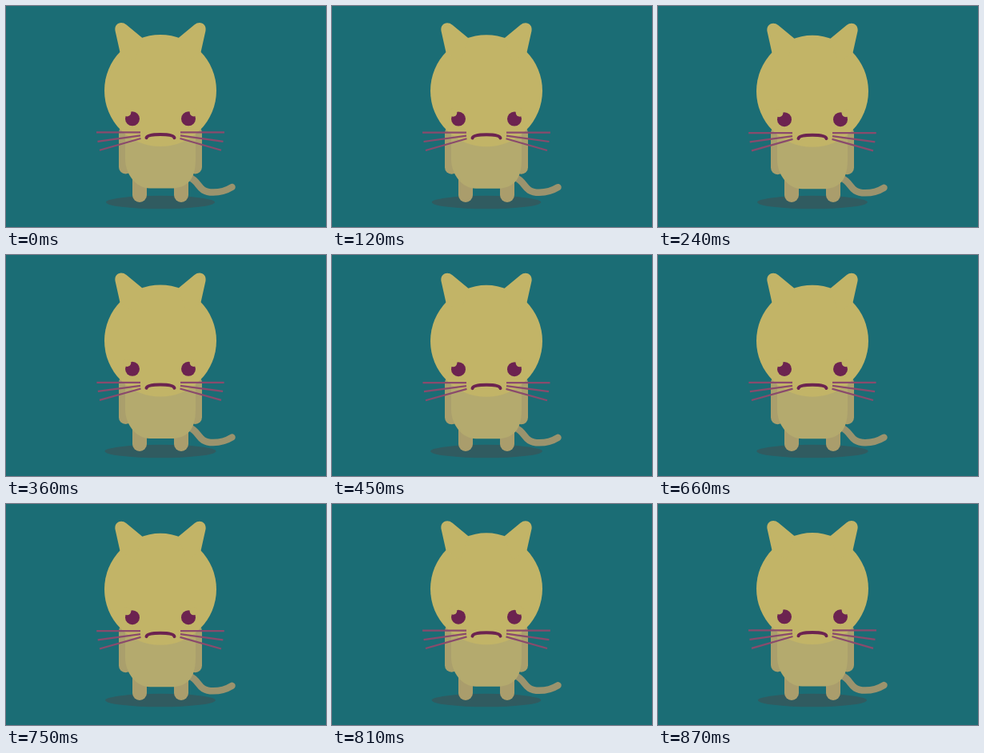
An HTML page for the animation above (0.9 s loop, 400 px wide and 277 px high).

```html
<!DOCTYPE html>
<html>
<head>
<meta charset="utf-8">
<style>
  html, body { margin: 0; width: 100%; height: 100%; overflow: hidden; background: #1b6d75; }
  svg { display: block; width: 100vw; height: 100vh; }
  .line { fill: none; stroke-linecap: round; }
</style>
</head>
<body>
<svg viewBox="0 0 400 277">
  <ellipse id="shadow" cx="193" cy="246" rx="68" ry="8.3" fill="#305b60"/>
  <path id="tail" class="line" stroke="#9b936d" stroke-width="8.5"/>
  <g fill="#aa9d6c">
    <rect x="158" y="200" width="18" height="46" rx="9"/>
    <rect x="210" y="200" width="18" height="46" rx="9"/>
  </g>
  <g id="cat">
    <g fill="#aa9f6c">
      <rect x="141" y="150" width="17" height="60.5" rx="8.5"/>
      <rect x="228" y="150" width="17" height="60.5" rx="8.5"/>
    </g>
    <path fill="#b4aa6e" d="M149 150H237V192C237 218 226 228.500 206 228.500H180C162 228.500 149 210 149 192Z"/>
    <circle cx="193" cy="106" r="70" fill="#c2b467"/>
    <g id="side">
      <path fill="#c2b467" d="M136.500 31C135 22 144 18 150.500 23.500L171 40.500L160 70L142.500 58Z"/>
      <circle cx="158" cy="141.300" r="9" fill="#6c2350"/>
      <circle cx="151.300" cy="133.500" r="5" fill="#c2b467"/>
      <path id="whiskers" fill="none" stroke="#8a4a6c" stroke-width="2.200"/>
    </g>
    <use href="#side" transform="translate(386) scale(-1 1)"/>
    <path class="line" stroke="#6c2350" stroke-width="4" d="M175.500 165.300Q176.500 161 193 161T210.500 165.300"/>
  </g>
</svg>
<script>
const $ = id => document.getElementById(id);
const ease = p => (1 - Math.cos(Math.PI * p)) / 2;

// Sink slowly, hold briefly, then rise again.
function sinkAt(t) {
  if (t < 540) return ease(t / 540);
  if (t < 570) return 1;
  return 1 - ease((t - 570) / 330);
}

function draw(now) {
  const s = sinkAt(now % 900);
  const dy = 2 * s;
  $('cat').setAttribute('transform', `translate(0 ${dy})`);
  $('shadow').setAttribute('rx', 68 + 2 * s);
  $('tail').setAttribute('d',
    `M229 ${214.5 + dy}C243 ${220 + dy} 239 ${233.5 + dy} 259 ${233.5 + dy}Q272 ${233.5 + dy} 282.500 ${227 + dy}`);
  $('whiskers').setAttribute('d',
    `M${113 + s / 2} 158.300L168 158.300` +
    `M${114.5 + s / 2} ${169.8 - s / 2}L168 162.300` +
    `M117 ${180.8 - s / 2}L168.500 166`);
  requestAnimationFrame(draw);
}
requestAnimationFrame(draw);
</script>
</body>
</html>
```
